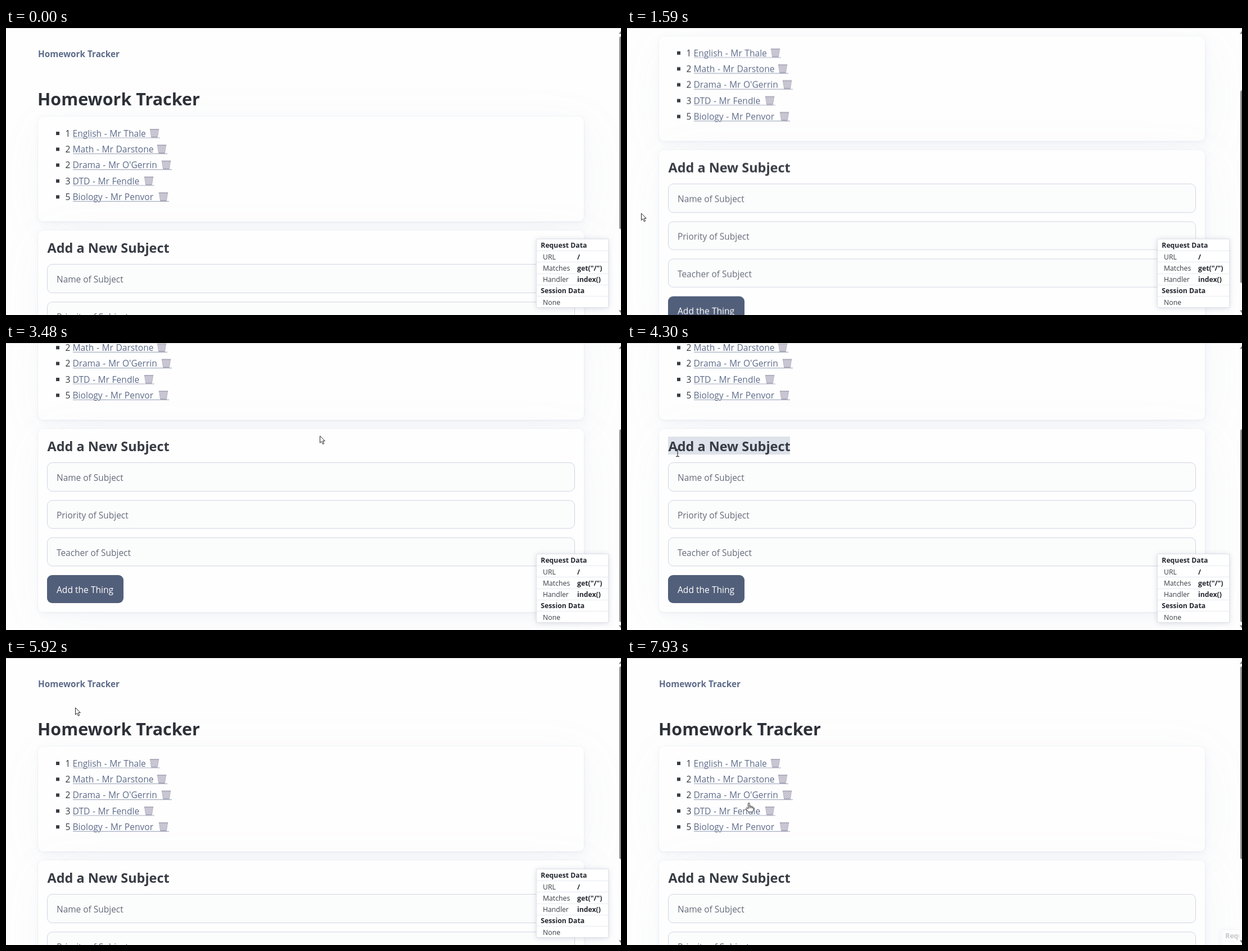
An HTML page that plays this animation: 1094 px wide and 512 px high, repeating every 8000 ms.

```html
<!DOCTYPE html>
<html lang="en">
<head>
<meta charset="utf-8">
<title>Homework Tracker</title>
<style>
html, body { margin: 0; width: 100%; height: 100%; overflow: hidden; background: #fefefe; }
body { position: relative; font-family: "Open Sans", "Noto Sans", sans-serif; }
#stage { position: absolute; inset: 0; overflow: hidden; }
#stage div, #stage svg { position: absolute; }
svg { left: 0; top: 0; overflow: visible; }
text { white-space: pre; }

#page, .thumb, #select, #panel, #cursor, #shapes { animation: 8s linear infinite; }

#page { left: 0; top: 0; width: 1094px; height: 720px; animation-name: scroll; }
.card {
  left: 57px; width: 971px; border-radius: 9px; background: #fefefe;
  box-shadow: 0 1px 4px rgba(129,145,181,.05), 2px 4px 14px rgba(129,145,181,.07),
    8px 16px 92px rgba(129,145,181,.06), 0 0 0 1px rgba(129,145,181,.04);
}
.title { font: 700 30.5px "Open Sans", sans-serif; fill: #2d3138; }
.nav { font: 700 15.3px "Open Sans", sans-serif; fill: #5d6b89; }
.sub { font: 700 23.45px "Open Sans", sans-serif; fill: #373c44; }
.list { font-size: 15.6px; word-spacing: .5px; fill: #373c44; }
.link { fill: #5d6b89; }
.rule { stroke: #a5aec0; stroke-width: 1.2; }
.form { font-size: 15.45px; fill: #646b79; }
.form rect { fill: #fbfcfc; stroke: #cfd5e2; }
#select { fill: #dee2ea; transform-origin: 290px 0; animation-name: select; }

#panel {
  left: 944px; top: 377px; width: 127px; height: 121px; background: #fff;
  box-shadow: 0 0 0 1px #dfe2ea, 0 1px 9px rgba(110,120,150,.3);
  font-size: 12.25px; animation-name: tuck;
}
#panel text { fill: #373c44; }
#panel .b { font-weight: 700; fill: #23272f; }
#panel path { stroke: #e7eaf0; fill: none; }

.track { left: 1089px; top: 0; width: 5px; height: 512px; background: #fcfcfc; }
.thumb { left: 1091px; top: 15px; width: 6px; height: 344px; border-radius: 3px; background: #8b8b8b; animation-name: thumb; }
.edge { left: 0; top: 0; width: 1094px; height: 1px; background: #dcdcdd; }

#cursor { left: -20px; top: -20px; width: 40px; height: 40px; overflow: hidden; animation-name: move; }
#shapes { animation-name: shape; animation-timing-function: step-end; }

@keyframes scroll {
  0%, 16.625% { transform: none; }
  19.875% { transform: translateY(-143px); }
  21.75%, 64% { transform: translateY(-208px); }
  66.625%, 100% { transform: none; }
}
@keyframes thumb {
  0%, 16.625% { transform: none; }
  19.875% { transform: translateY(96px); }
  21.75%, 64% { transform: translateY(139px); }
  66.625%, 100% { transform: none; }
}
@keyframes select {
  0%, 45.75% { transform: scaleX(0); }
  50.375%, 54.6% { transform: none; }
  54.62%, 100% { transform: scaleX(0); }
}
@keyframes tuck {
  0%, 87.5% { transform: none; opacity: 1; }
  91.25%, 100% { transform: translate(113px, 108px); opacity: .25; }
}
@keyframes move {
  0%, 2.48% { transform: translate(980px, 540px); }
  2.5% { transform: translate(980px, 500px); }
  4.25%, 6.625% { transform: translate(421px, 413px); }
  9.25%, 11.625% { transform: translate(44px, 369px); }
  12.5%, 15.125% { transform: translate(25px, 355px); }
  16%, 24.25% { transform: translate(25px, 330px); }
  26.875% { transform: translate(110px, 440px); }
  28.625% { transform: translate(190px, 395px); }
  31.25%, 31.5% { transform: translate(154px, 322px); }
  33% { transform: translate(235px, 250px); }
  34.75% { transform: translate(258px, 190px); }
  37.375% { transform: translate(120px, 455px); }
  40% { transform: translate(640px, 400px); }
  41.75% { transform: translate(985px, 290px); }
  43.5% { transform: translate(560px, 165px); }
  45.25%, 45.75% { transform: translate(287px, 190px); }
  50.375%, 52.875% { transform: translate(76px, 194px); }
  53.75%, 54.6% { transform: translate(90px, 196px); }
  56.375%, 59% { transform: translate(80px, 196px); }
  61.625%, 70.625% { transform: translate(8px, 229px); }
  74%, 74.5% { transform: translate(123px, 88px); }
  76.625%, 86.375% { transform: translate(109px, 48px); }
  90% { transform: translate(80px, 185px); }
  93.25% { transform: translate(110px, 322px); }
  96.5%, 96.6% { transform: translate(264px, 393px); }
  99.125%, 100% { transform: translate(217px, 258px); }
}
/* arrow 0, text beam -40px, hand -80px */
@keyframes shape {
  0%, 4.1%, 27.9%, 38%, 43%, 60%, 87%, 97% { transform: none; }
  2.5%, 28.4%, 40%, 44.75%, 96% { transform: translateX(-40px); }
  25.6%, 36.9%, 75.9%, 98.6%, 100% { transform: translateX(-80px); }
}
</style>
</head>
<body>
<div id="stage">
  <div id="page">
    <div class="card" style="top:158px;height:187px"></div>
    <div class="card" style="top:361px;height:327px"></div>
    <svg width="1094" height="720">
      <defs>
        <pattern id="mesh" width="3.2" height="3.2" patternUnits="userSpaceOnUse">
          <path d="M0 0L3.2 3.2M3.2 0L0 3.2" stroke="#aeabbc" stroke-width=".7"/>
        </pattern>
        <g id="bin">
          <path d="M1.5 2H16.5L14.4 16H3.6Z" fill="#dddbe4"/>
          <path d="M1.5 2H16.5L14.4 16H3.6Z" fill="url(#mesh)" stroke="#b4b1c1" stroke-width=".9"/>
          <path d="M.8 1.8H17.2M3.6 15.6H14.4" stroke="#aaa7b8" stroke-width="1.6"/>
        </g>
        <rect id="dot" x="89" y="185" width="6" height="6"/>
      </defs>

      <text class="nav" x="57" y="52">Homework Tracker</text>
      <text class="title" x="56" y="137.5">Homework Tracker</text>

      <g class="list">
        <g>
          <use href="#dot"/><text x="105.5" y="193.5">1</text>
          <text class="link" x="118.5" y="193.5">English - Mr Thale</text>
          <use href="#bin" x="255" y="179"/><path class="rule" d="M119 196H274"/>
        </g>
        <g transform="translate(0 28.3)">
          <use href="#dot"/><text x="105.5" y="193.5">2</text>
          <text class="link" x="118.5" y="193.5">Math - Mr Darstone</text>
          <use href="#bin" x="268" y="179"/><path class="rule" d="M119 196H287"/>
        </g>
        <g transform="translate(0 56.6)">
          <use href="#dot"/><text x="105.5" y="193.5">2</text>
          <text class="link" x="118.5" y="193.5">Drama - Mr O'Gerrin</text>
          <use href="#bin" x="276" y="179"/><path class="rule" d="M119 196H295"/>
        </g>
        <g transform="translate(0 85)">
          <use href="#dot"/><text x="105.5" y="193.5">3</text>
          <text class="link" x="118.5" y="193.5">DTD - Mr Fendle</text>
          <use href="#bin" x="245" y="179"/><path class="rule" d="M119 196H264"/>
        </g>
        <g transform="translate(0 113.3)">
          <use href="#dot"/><text x="105.5" y="193.5">5</text>
          <text class="link" x="118.5" y="193.5">Biology - Mr Penvor</text>
          <use href="#bin" x="271" y="179"/><path class="rule" d="M119 196H290"/>
        </g>
      </g>

      <rect id="select" x="73" y="375" width="217" height="32"/>
      <text class="sub" x="73.5" y="400.5">Add a New Subject</text>
      <g class="form">
        <rect x="73.5" y="421.5" width="938" height="51" rx="9"/>
        <rect x="73.5" y="488.8" width="938" height="50" rx="9"/>
        <rect x="73.5" y="555.3" width="938" height="50.5" rx="9"/>
        <text x="90" y="454">Name of Subject</text>
        <text x="90" y="521">Priority of Subject</text>
        <text x="90" y="587.5">Teacher of Subject</text>
      </g>
      <rect x="73" y="622" width="136" height="50" rx="9" fill="#525f7a"/>
      <text x="90" y="653.5" font-size="15.6" fill="#fff">Add the Thing</text>
    </svg>
  </div>

  <div id="panel">
    <svg width="127" height="121">
      <path d="M0 20.5H127M0 40.5H127M0 61.5H127M0 81.5H127M0 101.5H127"/>
      <text class="b" x="7.3" y="15">Request Data</text>
      <text x="11" y="35.5">URL</text><text class="b" x="72" y="35.5">/</text>
      <text x="11" y="55.5">Matches</text><text class="b" x="72" y="55.5">get("/")</text>
      <text x="11" y="76">Handler</text><text class="b" x="72" y="76">index()</text>
      <text class="b" x="7.3" y="96">Session Data</text>
      <text x="11" y="116.5">None</text>
    </svg>
  </div>

  <div class="track"></div>
  <div class="thumb"></div>
  <svg width="1094" height="512">
    <path d="M1090 10.5L1094 5V10.5ZM1090 503.5H1094V509Z" fill="#858585"/>
  </svg>
  <div class="edge"></div>

  <div id="cursor">
    <svg id="shapes" width="120" height="40">
      <path transform="translate(20 20)" fill="#fff" stroke="#222" stroke-linejoin="round"
        d="M.5 .7V13L3.4 10.4L5.5 15.2L7.6 14.3L5.5 9.6H9.3Z"/>
      <path transform="translate(60 20)" fill="none" stroke="#333" stroke-width="1.2"
        d="M-3 -6.4H-1Q0 -6.4 0 -5.2Q0 -6.4 1 -6.4H3M0 -5.5V5.5M-3 6.4H-1Q0 6.4 0 5.2Q0 6.4 1 6.4H3"/>
      <path transform="translate(100 20)" fill="#fff" stroke="#222" stroke-linejoin="round"
        d="M-1.5 11V1.8Q-1.5 .5 -.2 .5Q1 .5 1 1.8V6.5Q1 5.5 2.2 5.6Q3.4 5.7 3.4 7Q3.6 6.2 4.6 6.4Q5.7 6.6 5.7 7.8Q6.2 7.2 7 7.6Q7.8 8 7.8 9V12.5Q7.8 14.5 6.3 16.8H-.8Q-2.2 14.6 -5 11.6Q-6 10.3 -4.9 9.6Q-4 9 -2.9 9.9ZM1 6.5V10M3.4 7V10M5.7 7.8V10.3"/>
    </svg>
  </div>
</div>
</body>
</html>
```
